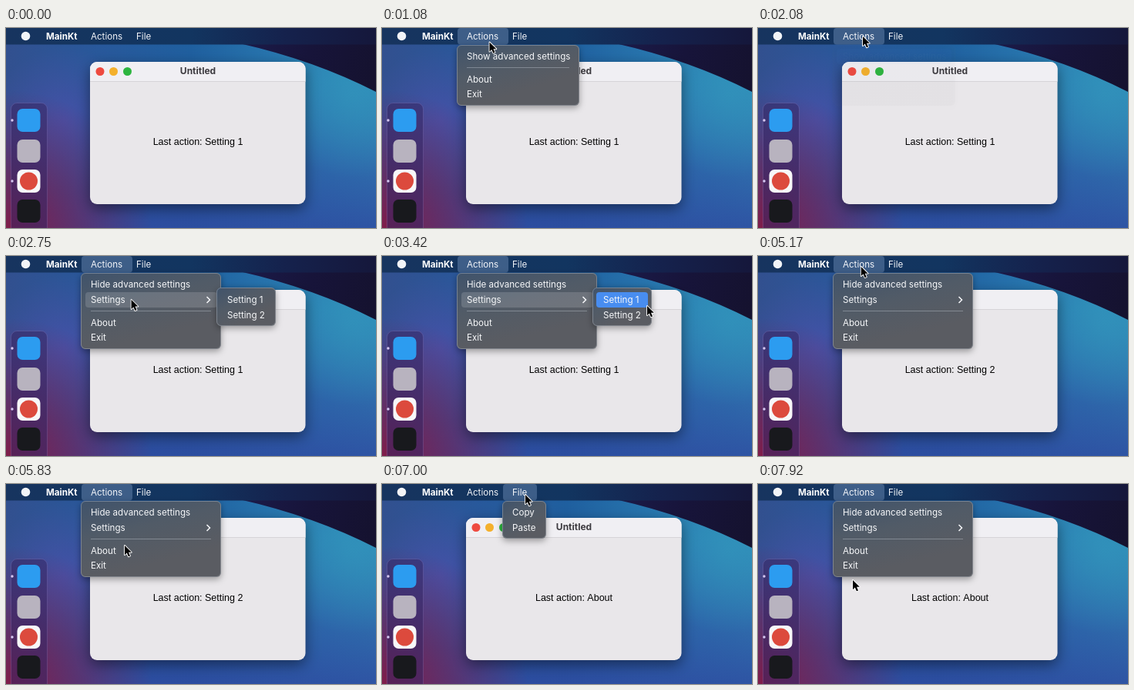
These frames come from a looping animation (480x260 px, 8 s). An HTML page with a canvas:

```html
<!DOCTYPE html>
<html lang="en">
<head>
<meta charset="utf-8">
<title>Menu bar demo</title>
<style>
html, body { margin: 0; width: 100%; height: 100%; overflow: hidden; background: #1c5688; }
canvas { display: block; width: 480px; height: 260px; }
</style>
</head>
<body>
<canvas id="stage"></canvas>
<script>
const W = 480, H = 260, LOOP = 8000, FPS = 12, FADE = 190;
const UI = '11.6px Inter, "Open Sans", sans-serif';
const canvas = document.getElementById('stage');
const ratio = window.devicePixelRatio || 1;
canvas.width = W * ratio;
canvas.height = H * ratio;
const ctx = canvas.getContext('2d');
ctx.scale(ratio, ratio);

// Pointer tip: time, x, y
const path = [
  [0, 250, 275], [200, 250, 275], [700, 134, 12], [950, 136, 12],
  [1350, 150, 38], [1800, 152, 37], [1900, 150, 35], [2080, 136, 11],
  [2250, 136, 12], [2620, 152, 56], [2800, 165, 57], [3180, 300, 57],
  [3420, 344, 65], [3580, 334, 76], [3740, 332, 77], [3880, 325, 74],
  [4420, 94, 9], [4750, 96, 10], [5000, 130, 12], [5200, 134, 14],
  [5750, 154, 80], [5970, 154, 80], [6500, 184, 14], [7080, 186, 14],
  [7330, 142, 13], [7500, 140, 14], [7920, 123, 125], [8000, 122, 128]
];

const baseMenu = (first, settings) => settings
  ? { x: 97, w: 182, h: 99, line: 72, tx: 110,
      items: [[first, 37], ['Settings', 57], ['About', 86.5], ['Exit', 106]] }
  : { x: 97, w: 159, h: 79, line: 52, tx: 110,
      items: [[first, 37], ['About', 66.5], ['Exit', 86]] };
const shortMenu = baseMenu('Show advanced settings', false);
const fullMenu = baseMenu('Hide advanced settings', true);
const fileMenu = { x: 156, w: 57, h: 49, tx: 169, items: [['Copy', 37], ['Paste', 57]] };
const subMenu = { x: 273, y: 41, w: 77, h: 50, tx: 287, items: [['Setting 1', 57], ['Setting 2', 77]] };

// Each menu stays from open to close, then fades if it was chosen from
const sessions = [
  { menu: shortMenu, open: 700, close: 1910, click: 1800, fade: true },
  { menu: fullMenu, open: 2160, close: 3820, click: 3700, fade: true, sub: 2700 },
  { menu: fullMenu, open: 5000, close: 5960, click: 5790, fade: true },
  { menu: fileMenu, open: 6600, close: 7250 },
  { menu: fullMenu, open: 7250, close: LOOP }
];
const titles = [
  { text: 'Actions', x: 110, left: 98, w: 66, on: [[700, 1910], [2060, 3820], [5000, 5960], [7250, LOOP]] },
  { text: 'File', x: 169, left: 157, w: 44, on: [[6600, 7250]] }
];

function box(x, y, w, h, r, fill, stroke) {
  ctx.beginPath();
  ctx.roundRect(x, y, w, h, r);
  if (fill) { ctx.fillStyle = fill; ctx.fill(); }
  if (stroke) { ctx.strokeStyle = stroke; ctx.lineWidth = 1; ctx.stroke(); }
}

function dot(x, y, r, fill) {
  ctx.beginPath();
  ctx.arc(x, y, r, 0, Math.PI * 2);
  ctx.fillStyle = fill;
  ctx.fill();
}

function label(text, x, y, font, fill, align = 'left') {
  ctx.font = font;
  ctx.fillStyle = fill;
  ctx.textAlign = align;
  ctx.fillText(text, x, y);
}

function linear(x0, y0, x1, y1, ...colors) {
  const g = ctx.createLinearGradient(x0, y0, x1, y1);
  colors.forEach((c, i) => g.addColorStop(i / (colors.length - 1), c));
  return g;
}

function glow(x, y, r, rgb, alpha) {
  const g = ctx.createRadialGradient(x, y, 0, x, y, r);
  g.addColorStop(0, `rgba(${rgb},${alpha})`);
  g.addColorStop(1, `rgba(${rgb},0)`);
  ctx.fillStyle = g;
  ctx.fillRect(0, 0, W, H);
}

function shadowed(blur, dy, alpha, draw) {
  ctx.save();
  ctx.shadowColor = `rgba(0,0,0,${alpha})`;
  ctx.shadowBlur = blur * ratio;
  ctx.shadowOffsetY = dy * ratio;
  draw();
  ctx.restore();
}

function wallpaper() {
  ctx.fillStyle = linear(0, 0, W, 0, '#32508f', '#28589b', '#1f5f9f', '#2878b0', '#2f8db7');
  ctx.fillRect(0, 0, W, H);
  ctx.fillStyle = linear(0, 70, 0, H, 'rgba(46,74,160,0)', 'rgba(46,74,160,.85)');
  ctx.fillRect(0, 0, W, H);
  glow(75, 120, 95, '86,80,176', .6);
  glow(0, 270, 190, '136,24,64', .95);
  glow(450, 85, 110, '50,148,188', .75);
  // dark corner above the bright wave
  ctx.beginPath();
  ctx.moveTo(303, 20);
  ctx.quadraticCurveTo(400, 42, W, 83);
  ctx.lineTo(W, 20);
  ctx.fillStyle = linear(303, 20, W, 60, '#1b1b4a', '#17143a', '#15122f');
  ctx.fill();
}

function dock() {
  box(6.5, 97.5, 47, 175, 8, 'rgba(50,36,98,.5)', 'rgba(170,150,220,.22)');
  box(14.5, 105, 30, 30, 7, '#2c9cf0');
  box(14.5, 145, 30, 30, 7, '#b8b3bf');
  box(14.5, 184, 30, 30, 7, '#f7f7f8');
  dot(29.5, 199, 11.5, '#dc4a3d');
  box(14.5, 223, 30, 30, 7, '#18191d');
  dot(8, 120, 1.7, '#d6c8f2');
  dot(8, 199, 1.7, '#d6c8f2');
}

function appWindow(action) {
  shadowed(18, 6, .45, () => box(109, 44, 279.5, 185, 9, '#e9e7ea'));
  box(109, 44, 279.5, 25, [9, 9, 0, 0], '#f0eff3');
  ctx.fillStyle = '#d6d4d8';
  ctx.fillRect(109, 69, 279.5, 1);
  dot(122, 56.5, 5.5, '#ee4a40');
  dot(139.5, 56.5, 5.5, '#f4b02c');
  dot(157.5, 56.5, 5.5, '#2db53f');
  label('Untitled', 249, 60, 'bold 12px Inter, "Open Sans", sans-serif', '#3d3b40', 'center');
  label('Last action: ' + action, 249, 152, '12.5px "Liberation Sans", Arial, sans-serif', '#000', 'center');
}

function menuBar(t) {
  ctx.fillStyle = linear(0, 0, W, 0, '#17345f', '#14355f', '#123560', '#15224d', '#15173b');
  ctx.fillRect(0, 0, W, 21.5);
  dot(25.5, 10.5, 5.8, '#f2f4f7');
  label('MainKt', 52, 15, 'bold ' + UI, '#fff');
  for (const item of titles) {
    if (item.on.some(([a, b]) => t >= a && t < b)) {
      box(item.left, 0, item.w, 21.5, 4, 'rgba(150,180,220,.32)');
    }
    label(item.text, item.x, 15, UI, '#f4f6fa');
  }
}

function rowAt(menu, p) {
  const inside = p.x > menu.x && p.x < menu.x + menu.w;
  return inside ? menu.items.find(([, y]) => Math.abs(p.y - y) < 10) : undefined;
}

function drawMenu(menu, active, parent) {
  const top = menu.y || 22;
  shadowed(8, 3, .35, () =>
    box(menu.x, top, menu.w, menu.h, 6, linear(menu.x, top, menu.x + 25, top + menu.h, '#40536b', '#515b67', '#5a5c62')));
  box(menu.x + .5, top + .5, menu.w - 1, menu.h - 1, 5.5, null, 'rgba(215,220,230,.32)');
  if (menu.line) {
    ctx.fillStyle = 'rgba(225,230,238,.32)';
    ctx.fillRect(menu.tx, menu.line - 1, menu.w - 26, 1);
  }
  for (const item of menu.items) {
    const [text, y] = item;
    if (item === parent) box(menu.x + 6, y - 10, menu.w - 11, 20, 4, 'rgba(255,255,255,.15)');
    else if (item === active) box(menu.x + 5, y - 10, menu.w - 10, 20, 4, '#488df0');
    label(text, menu.tx, y + 4.4, UI, '#f7f8fa');
    if (text === 'Settings') {
      ctx.beginPath();
      ctx.moveTo(260.5, y - 4);
      ctx.lineTo(264.5, y);
      ctx.lineTo(260.5, y + 4);
      ctx.strokeStyle = '#f7f8fa';
      ctx.lineWidth = 1.5;
      ctx.stroke();
    }
  }
}

function menus(t, p) {
  for (const s of sessions) {
    const end = s.close + (s.fade ? FADE : 0);
    if (t < s.open || t >= end) continue;
    const chosen = s.click && t >= s.click;
    const blink = chosen && t < s.click + 110 && t >= s.click + 40;
    const from = chosen ? pointer(s.click) : p;
    const subOpen = s.sub && t >= s.sub;
    ctx.globalAlpha = t < s.close ? 1 : (1 - (t - s.close) / FADE) ** 1.6;
    drawMenu(s.menu, blink || subOpen ? null : rowAt(s.menu, from), subOpen ? s.menu.items[1] : null);
    if (subOpen) drawMenu(subMenu, blink ? null : rowAt(subMenu, from));
    ctx.globalAlpha = 1;
  }
}

function pointer(t) {
  const i = Math.max(1, path.findIndex(k => k[0] >= t));
  const [t0, x0, y0] = path[i - 1], [t1, x1, y1] = path[i];
  const u = (t - t0) / (t1 - t0), e = u * u * (3 - 2 * u);
  return { x: x0 + (x1 - x0) * e, y: y0 + (y1 - y0) * e };
}

function drawPointer({ x, y }) {
  ctx.save();
  ctx.translate(x, y);
  const shape = new Path2D('M0 0V12.2L2.8 9.6L4.9 14.3L7 13.4L5 8.8H8.8Z');
  ctx.lineJoin = 'round';
  ctx.strokeStyle = '#fff';
  ctx.lineWidth = 1.8;
  ctx.stroke(shape);
  ctx.fillStyle = '#000';
  ctx.fill(shape);
  ctx.restore();
}

function draw(t) {
  const p = pointer(t);
  const action = t < 3900 ? 'Setting 1' : t < 6050 ? 'Setting 2' : 'About';
  wallpaper();
  dock();
  appWindow(action);
  menuBar(t);
  menus(t, p);
  drawPointer(p);
}

const start = performance.now();
function tick() {
  const t = (performance.now() - start) % LOOP;
  const step = Math.min(LOOP * FPS / 1000 - 1, Math.floor((t + 5) * FPS / 1000));
  draw(Math.round(step * 100 / FPS) * 10);
  requestAnimationFrame(tick);
}
tick();
</script>
</body>
</html>
```
